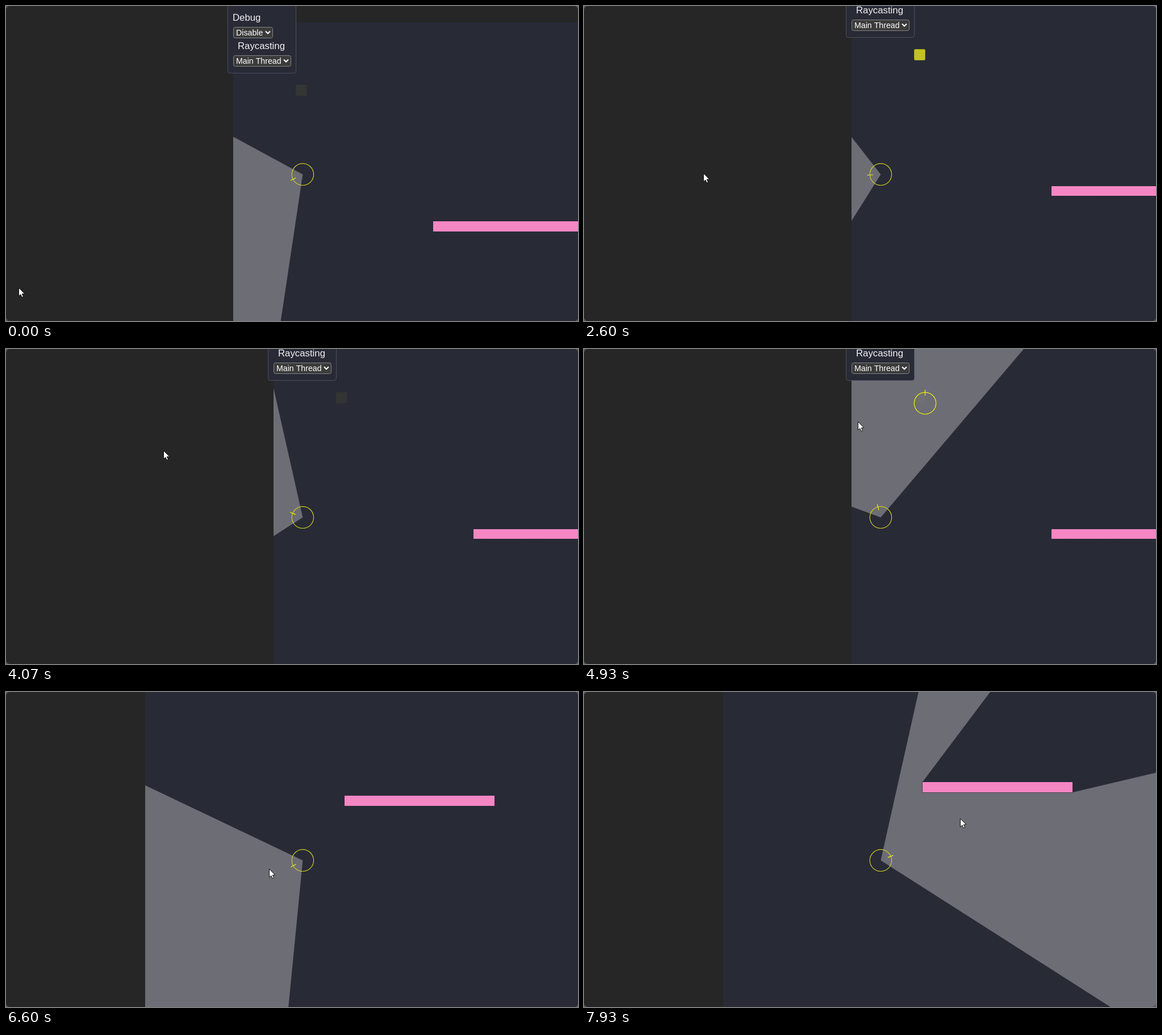
These frames come from a looping animation (1007x556 px, 8 s). An HTML page with a canvas:

```html
<!DOCTYPE html>
<html lang="en">
<head>
<meta charset="utf-8">
<title>Raycasting</title>
<style>
html, body { margin: 0; width: 100%; height: 100%; overflow: hidden; background: #262626; }
canvas { display: block; }
</style>
</head>
<body>
<canvas id="stage" width="1007" height="556"></canvas>
<script>
const W = 1007, H = 556, LOOP = 8000, TAU = Math.PI * 2;
const ctx = document.getElementById('stage').getContext('2d');
const FONT = '"Liberation Sans", Arial, sans-serif';
const FLOOR = '#282a36', LIT = '#6d6d75', YELLOW = '#cccc22', BRIGHT = '#f0f00c';
const FOV = 110 * Math.PI / 180;
const SCALE = 0.878;  // world units to pixels
const SPEED = 0.49;   // walking speed in pixels per ms
const player = { x: 522.4, y: 297.3 };
const eye = { x: 522.5, y: 257 };

// Walks of the player: start time, axis, shift of the floor
const walks = [
  [1795, 'y', -62.7], [2200, 'x', 71], [2760, 'y', 118.4], [3600, 'y', -118.4],
  [5931, 'y', -134.3], [6135, 'x', -226.5], [6610, 'y', -24]
];

// Waypoints of the pointer: time, x, y, viewing angle in degrees
const waypoints = [
  [0, 22, 497, 153.5], [1730, 178, 345, 168.5], [1930, 180, 339, 169.6],
  [3470, 248, 238, 186.8], [4330, 290, 154, 209], [4930, 482, 128, 255.3],
  [5870, 385, 202, 214], [6130, 402, 265, 190.5], [6600, 463, 312, 150.7],
  [7200, 565, 378, 66], [7930, 662, 223, -22.4]
];

function floorAt(t) {
  const pos = { x: 400.5, y: 29 };
  for (const [start, axis, shift] of walks) {
    const gone = Math.max(0, t - start) * SPEED;
    pos[axis] += Math.sign(shift) * Math.min(gone, Math.abs(shift));
  }
  return pos;
}

function pointerAt(t) {
  const i = waypoints.findIndex(p => p[0] > t);
  if (i < 0) return waypoints[waypoints.length - 1].slice(1);
  const a = waypoints[i - 1], b = waypoints[i];
  const u = (t - a[0]) / (b[0] - a[0]);
  return [1, 2, 3].map(n => a[n] + (b[n] - a[n]) * u);
}

function poly(points) {
  ctx.beginPath();
  points.forEach(([x, y]) => ctx.lineTo(x, y));
  ctx.closePath();
}

function box(x, y, w, h, r, fill, stroke) {
  ctx.beginPath();
  ctx.roundRect(x, y, w, h, r);
  ctx.fillStyle = fill;
  ctx.fill();
  if (stroke) {
    ctx.strokeStyle = stroke;
    ctx.lineWidth = 1;
    ctx.stroke();
  }
}

function text(str, x, y, size, color) {
  ctx.font = size + 'px ' + FONT;
  ctx.fillStyle = color;
  ctx.fillText(str, x, y);
}

function actor(x, y, aim, color) {
  const c = Math.cos(aim), s = Math.sin(aim);
  ctx.lineWidth = 1.2;
  ctx.strokeStyle = color;
  ctx.beginPath();
  ctx.arc(x, y, 19.2, 0, TAU);
  ctx.stroke();
  ctx.strokeStyle = BRIGHT;
  ctx.beginPath();
  ctx.moveTo(x + c * 13.5, y + s * 13.5);
  ctx.lineTo(x + c * 24, y + s * 24);
  ctx.stroke();
}

function conePath(aim) {
  const edge = a => [player.x + Math.cos(a) * 3000, player.y + Math.sin(a) * 3000];
  poly([[player.x, player.y], edge(aim - FOV / 2), edge(aim), edge(aim + FOV / 2)]);
}

function shadow(l, t, r, b) {
  const corners = [[l, t], [r, t], [r, b], [l, b]];
  const far = ([x, y]) => [x + (x - eye.x) * 30, y + (y - eye.y) * 30];
  ctx.fillStyle = FLOOR;
  corners.forEach((p, i) => {
    const q = corners[(i + 1) % 4];
    poly([p, q, far(q), far(p)]);
    ctx.fill();
  });
  ctx.fillRect(l - 0.7, t - 0.7, r - l + 1.2, b - t + 1.2);
}

function select(label, x, y, w) {
  box(x + 0.5, y + 0.5, w - 1, 19, 3, '#3b3b3b', '#858585');
  text(label, x + 5, y + 15, 14.2, '#ffffff');
  const cx = x + w - 9;
  ctx.strokeStyle = '#ffffff';
  ctx.lineWidth = 2;
  ctx.beginPath();
  ctx.moveTo(cx - 4, y + 7.5);
  ctx.lineTo(cx, y + 11.5);
  ctx.lineTo(cx + 4, y + 7.5);
  ctx.stroke();
}

function panel(x, y) {
  box(x - 9.5, y - 30.5, 120, 120, 4, FLOOR, '#4d4f62');
  text('Debug', x - 1, y - 3, 16.8, '#f2f2f2');
  select('Disable', x, y + 8, 70);
  text('Raycasting', x + 8, y + 47, 16.8, '#f2f2f2');
  select('Main Thread', x, y + 58, 102);
}

function pointer(x, y) {
  const shape = [[0, 0], [0, 14.5], [3.3, 11.6], [5.6, 16.6], [8, 15.6], [5.8, 10.6], [10.3, 10.4]];
  poly(shape.map(([px, py]) => [x + 0.5 + px, y + 0.5 + py]));
  ctx.fillStyle = '#ffffff';
  ctx.fill();
  ctx.strokeStyle = '#101010';
  ctx.lineWidth = 1;
  ctx.stroke();
}

function draw(t) {
  const { x: ox, y: oy } = floorAt(t);
  const [mx, my, deg] = pointerAt(t);
  const aim = deg * Math.PI / 180;

  ctx.fillStyle = '#555555';
  ctx.fillRect(0, 0, W, H);
  ctx.save();
  ctx.beginPath();
  ctx.roundRect(0, 0, W, H, 7);
  ctx.clip();
  ctx.fillStyle = '#262626';
  ctx.fillRect(0, 0, W, H);

  ctx.save();
  ctx.beginPath();
  ctx.rect(Math.floor(ox), Math.round(oy), 1200, 1200);
  ctx.clip();
  ctx.fillStyle = FLOOR;
  ctx.fillRect(0, 0, W, H);
  conePath(aim);
  ctx.fillStyle = LIT;
  ctx.fill();

  const at = (o, world) => Math.round(o + world * SCALE);
  const l = at(ox, 400), r = at(ox, 700), top = at(oy, 400), bottom = at(oy, 420);
  shadow(l, top, r, bottom);
  ctx.fillStyle = '#f586c4';
  ctx.fillRect(l, top, r - l, bottom - top);

  // The other actor shows only inside the lit cone
  ctx.save();
  conePath(aim);
  ctx.clip();
  actor(ox + 129, oy + 129.5, -Math.PI / 2, BRIGHT);
  ctx.restore();
  ctx.restore();

  // Blinking marker
  ctx.globalAlpha = (1 - Math.cos(TAU * (t / 976 - 0.087))) / 2;
  box(ox + 109.7, oy + 110, 19.5, 19.5, 2, YELLOW);
  ctx.globalAlpha = 1;

  actor(player.x, player.y, aim, YELLOW);
  panel(Math.floor(ox), Math.floor(oy));
  pointer(Math.round(mx), Math.round(my));
  ctx.restore();
}

const start = performance.now();
function tick() {
  draw((performance.now() - start) % LOOP);
  requestAnimationFrame(tick);
}
tick();
</script>
</body>
</html>
```
